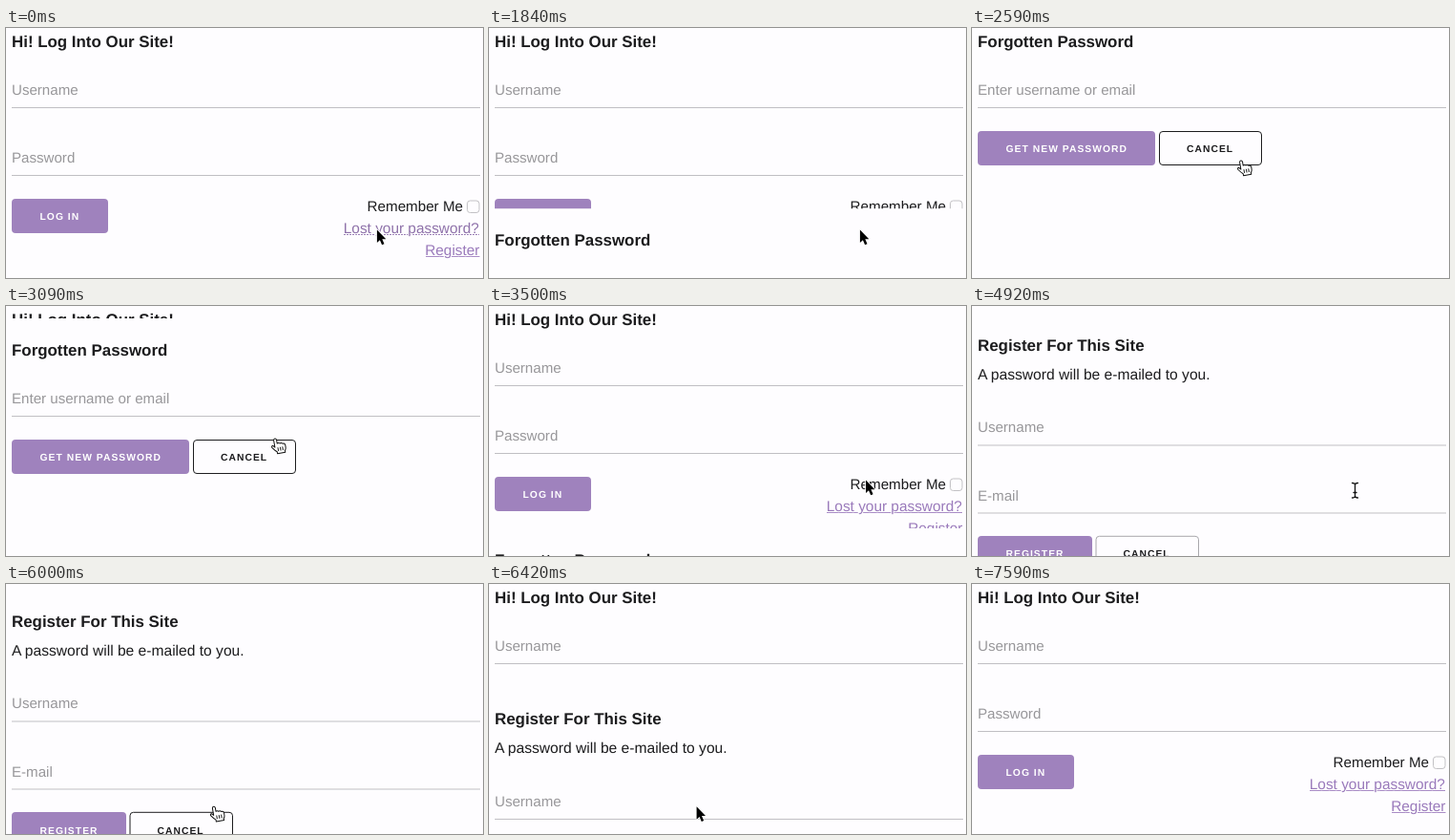
These frames come from a looping animation (500 by 262 pixels, 7750 ms). An HTML page:

```html
<!DOCTYPE html>
<html lang="en">
<head>
<meta charset="utf-8">
<title>Login form</title>
<style>
  html, body { margin: 0; width: 100%; height: 100%; overflow: hidden; background: #fefdff; }
  svg { display: block; width: 500px; height: 262px; }
  text { font: 15.2px "Liberation Sans", Arial, sans-serif; fill: #1c1c1e; text-rendering: geometricPrecision; }
  .title { font-size: 16.9px; font-weight: bold; }
  .note { font-size: 15.6px; }
  .hint { font-size: 15.1px; fill: #98979a; }
  .line { stroke: #c0bfc3; }
  .label { font-size: 10.3px; font-weight: bold; letter-spacing: 1.05px; }
  .primary { fill: #9f82bd; }
  .on { fill: #fff; }
  .cancel { fill: #fefdff; stroke: #a9a8ac; }
  .cancel.hover { stroke: #1c1c1e; }
  .link text { font-size: 15.4px; fill: #9a7abb; text-anchor: end; stroke: #fefdff; stroke-width: 2px; paint-order: stroke; }
  .link line { stroke: #a98cc6; }
  .link.hover text { fill: #8f72aa; }
  .link.hover line { stroke: #9c80b6; stroke-dasharray: 2 1; }
</style>
</head>
<body>
<svg viewBox="0 0 500 262">
  <clipPath id="fold"><rect id="window" width="500" height="262"/></clipPath>

  <g id="login" clip-path="url(#fold)">
    <text class="title" x="6" y="20.2">Hi! Log Into Our Site!</text>
    <text class="hint" x="6" y="70">Username</text>
    <path class="line" d="M6 83.5H497"/>
    <text class="hint" x="6" y="141">Password</text>
    <path class="line" d="M6 154.5H497"/>
    <rect class="primary" x="6" y="179" width="101" height="36" rx="4"/>
    <text class="label on" x="35.5" y="201.3">LOG IN</text>
    <text x="479" y="192" text-anchor="end">Remember Me</text>
    <rect x="483.5" y="181" width="12.5" height="12.5" rx="3" fill="#fefdff" stroke="#c3c2c5"/>
    <g class="link" id="lost">
      <line x1="354" y1="216.5" x2="496" y2="216.5"/>
      <text x="495.8" y="214.8">Lost your password?</text>
    </g>
    <g class="link">
      <line x1="440" y1="239.5" x2="496.5" y2="239.5"/>
      <text x="496.5" y="237.8">Register</text>
    </g>
  </g>

  <g id="forgot">
    <text class="title" x="6" y="20.2">Forgotten Password</text>
    <text class="hint" x="6" y="70">Enter username or email</text>
    <path class="line" d="M6 83.5H497"/>
    <rect class="primary" x="6" y="108" width="186" height="36" rx="4"/>
    <text class="label on" x="35.5" y="130.3">GET NEW PASSWORD</text>
    <rect class="cancel" x="196.5" y="108.5" width="107" height="35" rx="3.5"/>
    <text class="label" x="225" y="130.3">CANCEL</text>
  </g>

  <g id="register">
    <text class="title" x="6" y="44.6">Register For This Site</text>
    <text class="note" x="6" y="75">A password will be e-mailed to you.</text>
    <text class="hint" x="6" y="130.4">Username</text>
    <path class="line" d="M6 144H497"/>
    <text class="hint" x="6" y="201.6">E-mail</text>
    <path class="line" d="M6 215H497"/>
    <rect class="primary" x="6" y="239" width="120" height="36" rx="4"/>
    <text class="label on" x="35.5" y="261.5">REGISTER</text>
    <rect class="cancel" x="130" y="239.3" width="107.5" height="35" rx="3.5"/>
    <text class="label" x="158.5" y="261.5">CANCEL</text>
  </g>

  <g id="cursor">
    <path id="arrow" d="M0 0V13.4L3 10.6L5.2 15.6L7.6 14.6L5.4 9.7H9.4Z" stroke="#fff" stroke-width="1.6" paint-order="stroke"/>
    <g id="hand" transform="rotate(-10)" fill="#fff" stroke="#111" stroke-linejoin="round" stroke-linecap="round">
      <path d="M-1.5 9V1.4Q-1.3 0 0 0T1.5 1.4V5.4Q3 4.4 4.3 5.8Q6 5 7.1 6.6Q9.5 6.2 9.6 8.5V11Q9.5 13 8.3 14V16H0V14Q-2 12.3-4.6 8.6Q-5 6.8-3.3 6.9Z"/>
      <path d="M1.5 10V13M4 10V13M6.4 10V13" stroke-width=".9"/>
    </g>
    <g id="beam" fill="none" stroke-linecap="round">
      <path d="M-3-7.5Q0-7.5 0-5.5Q0-7.5 3-7.5M0-5.5V6M-3 8Q0 8 0 6Q0 8 3 8M-1.5 2.5H1.5" stroke="#fff" stroke-width="3"/>
      <path d="M-3-7.5Q0-7.5 0-5.5Q0-7.5 3-7.5M0-5.5V6M-3 8Q0 8 0 6Q0 8 3 8M-1.5 2.5H1.5" stroke="#111" stroke-width="1.3"/>
    </g>
  </g>
</svg>

<script>
const LOOP = 7750, STEP = 1000 / 12, SLIDE = 600, LOGIN_HEIGHT = 248;
const $ = id => document.getElementById(id);
const clamp = v => Math.min(1, Math.max(0, v));
const swing = p => (1 - Math.cos(Math.PI * clamp(p))) / 2;
const between = (t, a, b) => t >= a && t < b;
const show = (id, on) => $(id).style.display = on ? "" : "none";
const move = (id, x, y) => $(id).setAttribute("transform", `translate(${x} ${y})`);

// The login panel alternately folds up and unfolds at these times.
const slides = [1639, 2995, 4351, 6150];

// Pointer stops: time, x, y
const stops = [
  [0, 388.9, 211.6], [2000, 388.9, 211.6], [2500, 281.8, 139], [3080, 281.8, 139],
  [3500, 395, 182.6], [4000, 383, 209], [4240, 466, 230], [4400, 466, 230],
  [4830, 401.5, 193], [5200, 401.5, 193], [5840, 217.6, 233.3], [7000, 217.6, 233.3],
  [7250, 226, 268], [LOOP, 226, 268]
];

function loginHeight(t) {
  return slides.reduce((h, start, i) =>
    h + (i % 2 ? 1 : -1) * LOGIN_HEIGHT * swing((t - start) / SLIDE), LOGIN_HEIGHT);
}

function pointerAt(t) {
  const i = stops.findIndex(s => s[0] > t);
  const [t0, x0, y0] = stops[i - 1], [t1, x1, y1] = stops[i];
  const k = swing((t - t0) / (t1 - t0));
  return [x0 + (x1 - x0) * k, y0 + (y1 - y0) * k];
}

function pointerShape(t) {
  if (between(t, 2450, 3150) || between(t, 4200, 4480) || between(t, 5740, 6400)) return "hand";
  return between(t, 4700, 5740) ? "beam" : "arrow";
}

function draw(t) {
  const h = Math.max(0, loginHeight(t));
  $("window").setAttribute("height", h >= LOGIN_HEIGHT - .1 ? 262 : h);
  const registering = t > slides[2];
  show("forgot", !registering);
  show("register", registering);
  // The heading margin only counts while the login panel is open.
  move("forgot", 0, h > .1 ? h + 19 : 0);
  move("register", 0, h);

  $("lost").classList.toggle("hover", t < slides[0]);
  document.querySelector("#forgot .cancel").classList.toggle("hover", between(t, 2450, 3150));
  document.querySelector("#register .cancel").classList.toggle("hover", between(t, 5740, 6300));

  move("cursor", ...pointerAt(t));
  const shape = pointerShape(t);
  for (const id of ["arrow", "hand", "beam"]) show(id, id === shape);
}

function tick() {
  const t = performance.now() % LOOP;
  draw(Math.floor(t / STEP) * STEP);
  requestAnimationFrame(tick);
}
tick();
</script>
</body>
</html>
```
